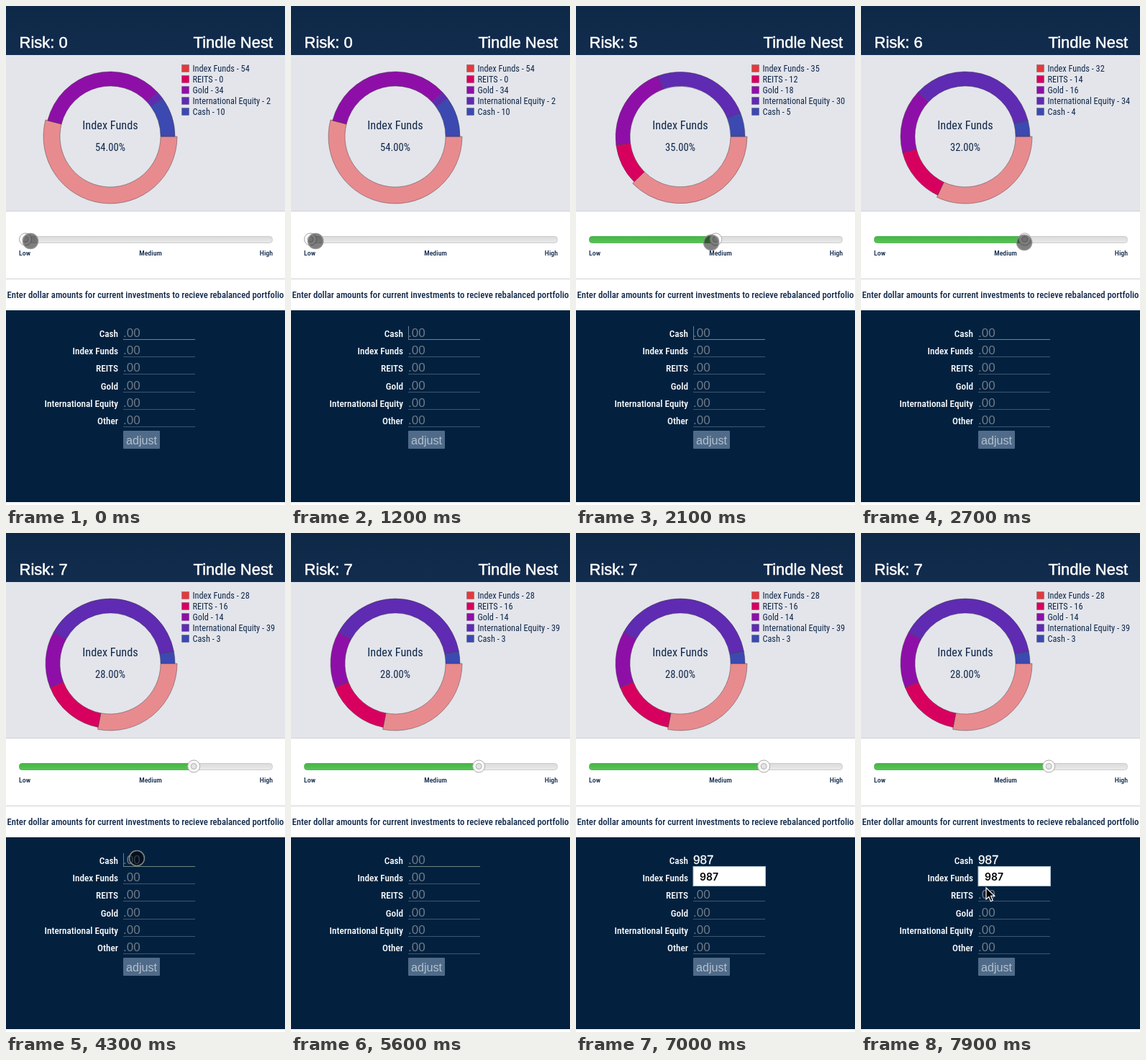
Animation of 388 by 692 pixels, one loop 8 s. Source, as an HTML page:

```html
<!DOCTYPE html>
<html lang="en">
<head>
<meta charset="utf-8">
<title>Portfolio risk slider</title>
<style>
  html, body { margin: 0; width: 100%; height: 100%; overflow: hidden; }
  svg { display: block; width: 100vw; height: 100vh; font: 17px "Liberation Sans", Arial, sans-serif; }
  .narrow {
    font-family: "Roboto Condensed", "Liberation Sans Narrow", "Open Sans", sans-serif;
    font-stretch: condensed;
    font-size: calc(var(--size) * var(--fit, 1));
    fill: #10284a;
  }
  .title { font-size: 22px; fill: #fff; stroke: #fff; stroke-width: .5px; }
  .legend { --size: 14.5px; }
  .label { --size: 15.6px; font-weight: 500; fill: #fff; text-anchor: end; }
  .hint { --size: 15px; font-weight: 500; text-anchor: middle; }
  .scale { --size: 11.6px; font-weight: 500; }
  .name { --size: 19.2px; text-anchor: middle; }
  .percent { --size: 17.2px; text-anchor: middle; }
  .empty { fill: #6f7a86; }
  .typed { fill: #fff; stroke: #fff; stroke-width: .3px; }
  .option { font: 600 14px Inter, sans-serif; fill: #000; }
  .end { text-anchor: end; }
  .middle { text-anchor: middle; }
</style>
</head>
<body>
<svg viewBox="0 0 388 692" preserveAspectRatio="none">
  <defs>
    <linearGradient id="header" x2="0" y2="1">
      <stop stop-color="#0e2847"/><stop offset="1" stop-color="#122c4e"/>
    </linearGradient>
    <linearGradient id="track" x2="0" y2="1">
      <stop stop-color="#dadada"/><stop offset="1" stop-color="#ebebeb"/>
    </linearGradient>
    <linearGradient id="filled" x2="0" y2="1">
      <stop stop-color="#44b545"/><stop offset="1" stop-color="#58c556"/>
    </linearGradient>
  </defs>
  <rect width="388" height="692" fill="#fff"/>
  <rect width="388" height="68" fill="url(#header)"/>
  <rect y="68" width="388" height="216" fill="#e3e5eb"/>
  <path d="M0 284.5H388M0 378.5H388" stroke="#cfd1d4"/>
  <rect y="422" width="388" height="266" fill="#03213f"/>
  <text class="title end" x="371" y="58">Tindle Nest</text>
  <rect x="18.5" y="319.5" width="352" height="9" rx="4" fill="url(#track)" stroke="#cdcdcd"/>
  <text class="narrow scale" x="18" y="346">Low</text>
  <text class="narrow scale middle" x="201" y="346">Medium</text>
  <text class="narrow scale end" x="371" y="346">High</text>
  <text id="hint" class="narrow hint" x="194" y="405">Enter dollar amounts for current investments to recieve rebalanced portfolio</text>
  <g id="form"></g>
  <rect x="163" y="589" width="51" height="25" rx="1" fill="#4f6b89"/>
  <text class="middle" x="188.5" y="607.5" style="font-size:16.2px" fill="#b3c0ce">adjust</text>
  <g id="live"></g>
</svg>
<script>
const LOOP = 8000, MORPH = 300;
const CENTER = { x: 145, y: 181 }, INNER = 70, OUTER = 90, RAISED = 93;
const ASSETS = ['Index Funds', 'REITS', 'Gold', 'International Equity', 'Cash'];
const COLORS = ['#e23a3e', '#d8005f', '#8e0fa8', '#5f2bb2', '#3c49b0'];
const FIELDS = ['Cash', 'Index Funds', 'REITS', 'Gold', 'International Equity', 'Other'];
const HISTORY = ['987', '98', '986', '9', '9009', '907'];

// Allocation for each risk level, and the time the slider reaches it.
const PLANS = [
  [54, 0, 34, 2, 10], [51, 2, 32, 6, 9], [45, 6, 28, 13, 8], [41, 8, 25, 19, 7],
  [38, 10, 22, 24, 6], [35, 12, 18, 30, 5], [32, 14, 16, 34, 4], [28, 16, 14, 39, 3]
];
const RISK_TIMES = [-1000, 1220, 1380, 1660, 1840, 2010, 2360, 3100];

const POINTER = [
  [0, 34, 326], [1200, 34, 326], [1500, 95, 325], [2100, 188, 328], [2700, 227, 328],
  [3200, 264, 327], [3700, 264, 327], [4200, 182, 451], [4800, 182, 451]
];
const RETURN = [[7650, 176, 530], [7900, 174, 492], [8000, 174, 492]];

const svg = document.querySelector('svg');
const live = document.getElementById('live');
const lerp = (a, b, k) => a + (b - a) * k;
const easeInOut = k => k < .5 ? 4 * k ** 3 : 1 - 4 * (1 - k) ** 3;
const text = (cls, x, y, content) => `<text class="${cls}" x="${x}" y="${y}">${content}</text>`;

function along(path, t) {
  const i = Math.max(1, path.findIndex(([time]) => time >= t));
  const [a, b] = [path[i - 1], path[i]];
  const k = (t - a[0]) / (b[0] - a[0]);
  return [lerp(a[1], b[1], k), lerp(a[2], b[2], k)];
}

function polar(radius, share) {
  const angle = share / 100 * 2 * Math.PI;
  return [CENTER.x + radius * Math.cos(angle), CENTER.y + radius * Math.sin(angle)];
}

const startOf = (plan, i) => plan.slice(0, i).reduce((sum, value) => sum + value, 0);

// Slice corners travel in straight lines while the arc radii stay fixed.
function donut(from, to, k) {
  return ASSETS.map((_, i) => {
    const radius = i ? OUTER : RAISED;
    const corner = (r, n) => {
      const a = polar(r, startOf(from, n)), b = polar(r, startOf(to, n));
      return a.map((value, axis) => lerp(value, b[axis], k).toFixed(2)).join(' ');
    };
    const large = +(to[i] > 50);
    const d = `M${corner(radius, i)}A${radius} ${radius} 0 ${large} 1 ${corner(radius, i + 1)}` +
      `L${corner(INNER, i + 1)}A${INNER} ${INNER} 0 ${large} 0 ${corner(INNER, i)}Z`;
    return `<path d="${d}" fill="${i ? COLORS[i] : '#e88b8f'}" stroke="#333" stroke-opacity=".6" stroke-width=".7"/>`;
  }).join('');
}

function legend(plan) {
  return ASSETS.map((name, i) =>
    `<rect x="244.5" y="${81.5 + 15 * i}" width="10" height="10" fill="${COLORS[i]}" stroke="#333" stroke-opacity=".35" stroke-width=".7"/>` +
    text('narrow legend', 259.5, 91 + 15 * i, `${name} - ${plan[i]}`)).join('');
}

function slider(risk) {
  const x = 27 + 33.45 * risk;
  const bar = risk ? `<rect x="18.5" y="319.5" width="${x - 18.5}" height="9" rx="4" fill="url(#filled)" stroke="#4bb04b" stroke-width=".7"/>` : '';
  return bar + `<circle cx="${x}" cy="323.5" r="8.5" fill="#fafafa" stroke="#aaa"/>` +
    `<circle cx="${x}" cy="323.5" r="4" fill="#e4e4e4" stroke="#b0b0b0"/>`;
}

function cashField(t) {
  const typed = t < 6100 ? '' : t < 6400 ? '9' : t < 6700 ? '98' : '987';
  const caretOn = t % 1000 >= 100 && t % 1000 < 600 || t >= 6100 && t < 6700;
  const caretX = 163.5 + typed.length * 9.45;
  const caret = caretOn ? `<path d="M${caretX} 444V462" stroke="#8796a5" stroke-width=".8"/>` : '';
  if (!typed) return text('empty', 163, 459, '.00') + caret;

  const options = HISTORY.filter(value => value.startsWith(typed));
  return text('typed', 163, 459, typed) + caret +
    `<rect x="163" y="462.5" width="100.5" height="${options.length * 25 + 2}" fill="#fff" stroke="#a9bdca"/>` +
    options.map((value, i) => text('option', 172, 482 + 25 * i, value)).join('');
}

function pointer(t) {
  if (t >= 4800 && t < 7650) return '';
  const [x, y] = along(t < 4800 ? POINTER : RETURN, t);
  if (t < 3600 || t >= 4200 && t < 4550)
    return `<circle cx="${x}" cy="${y}" r="10.5" fill="#000" fill-opacity=".5" stroke="#8c8c8c" stroke-opacity=".9" stroke-width="1.6"/>`;
  return `<path transform="translate(${x} ${y})" d="M0 0V16L3.8 12.5L6.5 18.7L9.2 17.5L6.6 11.4H11.7Z" stroke="#fff" stroke-width="1.2"/>`;
}

function draw(t) {
  const risk = RISK_TIMES.findLastIndex(time => time <= t);
  const plan = PLANS[risk];
  const k = easeInOut(Math.min(1, (t - RISK_TIMES[risk]) / MORPH));
  live.innerHTML = text('title', 18.5, 58, `Risk: ${risk}`) +
    donut(PLANS[Math.max(0, risk - 1)], plan, k) +
    text('narrow name', 145, 171, ASSETS[0]) +
    text('narrow percent', 145, 201, `${plan[0].toFixed(2)}%`) +
    legend(plan) + slider(risk) + cashField(t) + pointer(t);
}

document.getElementById('form').innerHTML = FIELDS.map((name, i) => {
  const y = Math.round(24.2 * i);
  return text('narrow label', 156, 458.5 + y, name) +
    (i ? text('empty', 163, 459 + y, '.00') : '') +
    `<path d="M163 ${462.5 + y}H263" stroke="${i ? '#3d566f' : '#71857f'}"/>`;
}).join('');

// Size the condensed face so the hint line spans the stage.
svg.style.setProperty('--fit', 385 / document.getElementById('hint').getComputedTextLength());

function frame() {
  draw(performance.now() % LOOP);
  requestAnimationFrame(frame);
}
frame();
</script>
</body>
</html>
```
